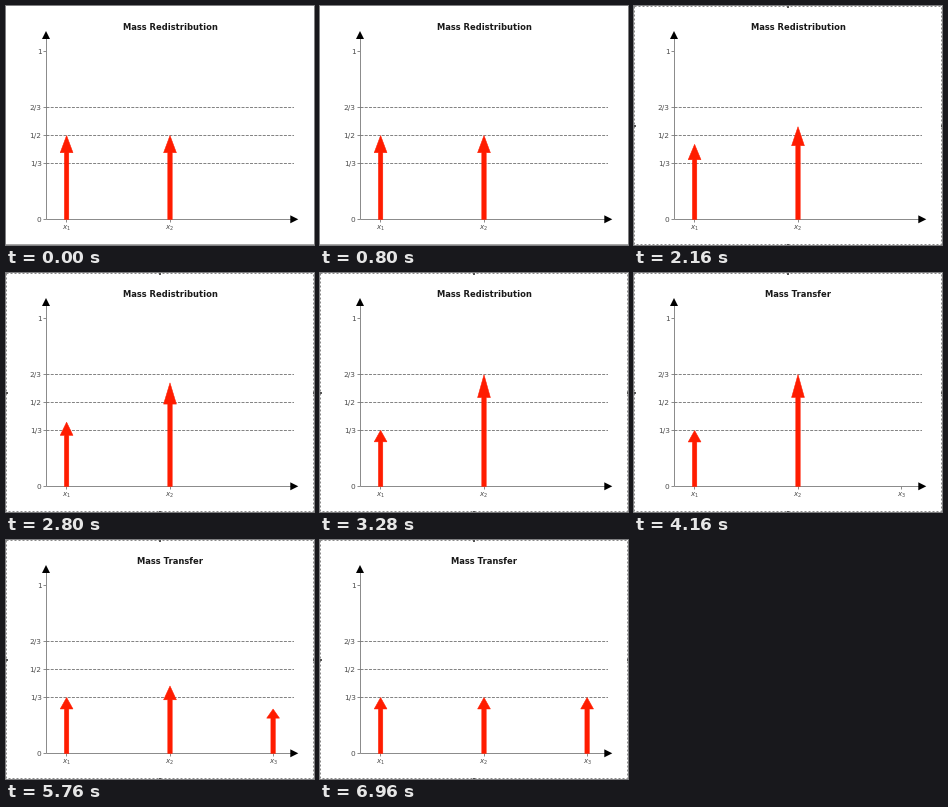
Write a matplotlib script that moves like this. It is 308 px wide and 239 px high and loops after 7040 ms.

```python
import numpy as np
import matplotlib.pyplot as plt
from matplotlib.animation import FuncAnimation
from matplotlib.patches import Polygon

W, H, DPI = 308, 239, 72
FRAMES, STEP = 88, 80
BASE, UNIT, LEFT = 213.5, 168, 40.5      # axis origin and height of mass 1
XS = (60.6, 164, 267.1)
RED, GREY, DARK = "#ff1c00", "#8c8c8c", "#4c4c4c"
SPLIT, FOCUS = 3520, 1680                # title change, border appearance

plt.rcParams.update({"font.family": "DejaVu Sans",
                     "mathtext.fontset": "dejavusans"})
fig = plt.figure(figsize=(W / DPI, H / DPI), dpi=DPI, facecolor="white")
ax = fig.add_axes([0, 0, 1, 1])
ax.set(xlim=(0, W), ylim=(H, 0))
ax.axis("off")


def line(x, y, color=GREY, width=1, **kw):
    return ax.plot(x, y, color=color, lw=width, snap=False,
                   solid_capstyle="butt", **kw)[0]


def level(mass):
    return BASE - UNIT * mass


def x_label(i):
    x = XS[i]
    tick = line([int(x) + 0.5] * 2, [BASE, BASE + 3], zorder=2)
    text = ax.text(x, 222, f"$x_{i + 1}$", size=7.1, color=DARK,
                   ha="center", va="center")
    return tick, text


def arrow_shape(x, mass):
    height = UNIT * mass
    tip, neck = BASE - height, BASE - 0.795 * height
    return [(x - 2.2, BASE), (x - 2.2, neck), (x - 6.4, neck), (x, tip),
            (x + 6.4, neck), (x + 2.2, neck), (x + 2.2, BASE)]


# Axes, ticks and guide lines
line([LEFT, LEFT], [32, BASE])
line([LEFT, 286], [BASE, BASE])
for points in ([(40, 25), (36, 33), (44, 33)],
               [(292.3, 213.3), (284.3, 209.3), (284.3, 217.3)]):
    ax.add_patch(Polygon(points, fc="black", lw=0, zorder=4))
for mass, name in ((0, "0"), (1 / 3, "1/3"), (1 / 2, "1/2"),
                   (2 / 3, "2/3"), (1, "1")):
    y = level(mass)
    line([LEFT - 3, LEFT], [y, y])
    ax.text(35.6, y, name, size=7.4, color=DARK, ha="right",
            va="center_baseline")
    if 0 < mass < 1:
        line([LEFT, 288], [y, y], "#666666", 0.8, dashes=(3.7, 1.6))
x_label(0)
x_label(1)
third = x_label(2)

title = ax.text(164, 24.2, "", size=8.35, weight="bold", color="#1a1a1a",
                ha="center", va="baseline")
arrows = [ax.add_patch(Polygon(arrow_shape(x, 0.5), fc=RED, ec=RED, lw=0.5,
                               joinstyle="miter", zorder=3))
          for x in XS]

# Window edge, replaced later by a selection border with handles
edge = line([0, W], [238.5, 238.5], "#a6a6a6")
border = [line([0.5, 307.5, 307.5, 0.5, 0.5], [0.5, 0.5, 238.5, 238.5, 0.5],
               "#8a8a8a", 1, dashes=(2, 2))]
border += ax.plot([154, 154, 0.5, 307.5], [0.5, 238.5, 119.5, 119.5], "s",
                  ms=2.5, mfc="#555555", mew=0)


def progress(t, start, end):
    return float(np.clip((t - start) / (end - start), 0, 1))


def draw(frame):
    t = frame * STEP
    moved = progress(t, 1640, 3290) / 6
    shared = progress(t, 4450, 6100) / 3
    masses = (1 / 2 - moved, 1 / 2 + moved - shared, shared)
    for arrow, x, mass in zip(arrows, XS, masses):
        arrow.set_xy(arrow_shape(x, mass))
        arrow.set_visible(mass > 0)
    transfer = t >= SPLIT
    title.set_text("Mass Transfer" if transfer else "Mass Redistribution")
    for part in third:
        part.set_visible(transfer)
    edge.set_visible(t < FOCUS)
    for part in border:
        part.set_visible(t >= FOCUS)
    return [*arrows, title, *third, edge, *border]


anim = FuncAnimation(fig, draw, frames=FRAMES, interval=STEP, repeat=True,
                     repeat_delay=0, blit=False)
plt.show()
```
